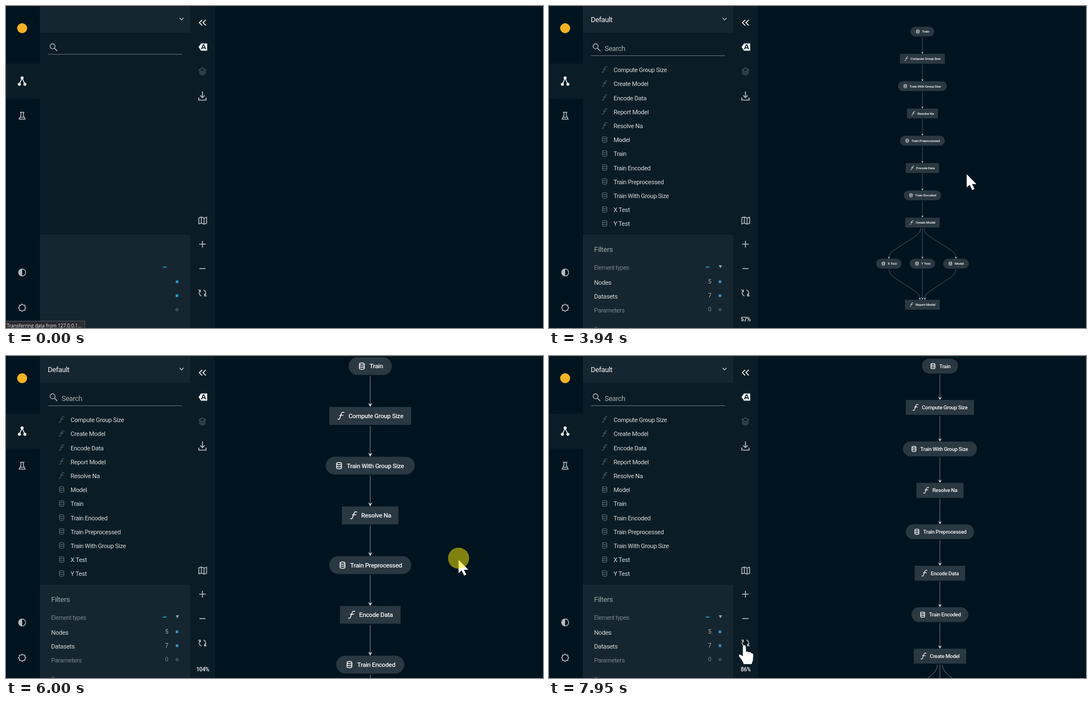
Animation, 965 px wide and 580 px high, one loop 8000 ms. Source, as an HTML page with a canvas:

```html
<!DOCTYPE html>
<html lang="en">
<head>
<meta charset="utf-8">
<title>Pipeline graph</title>
<style>
  html, body { margin: 0; width: 100%; height: 100%; overflow: hidden; background: #001420; }
  canvas { display: block; width: 965px; height: 580px; }
</style>
</head>
<body>
<canvas id="stage" width="965" height="580"></canvas>
<script>
const ctx = document.getElementById('stage').getContext('2d');
const LOOP = 8000, ROW = 86.4;
const SANS = 'Roboto, "Open Sans", sans-serif';
const BG = '#001420', PANEL = '#0a1d27', RAISED = '#162630', NODE = '#2a3841';
const WHITE = '#f2f4f5', SOFT = '#d3d8da', GREY = '#b3babe', DIM = '#77828a', FAINT = '#53616a';

const functions = ['Compute Group Size', 'Create Model', 'Encode Data', 'Report Model', 'Resolve Na'];
const datasets = ['Model', 'Train', 'Train Encoded', 'Train Preprocessed', 'Train With Group Size', 'X Test', 'Y Test'];

// label, width, x, y relative to the first node at 100 %
const nodes = [
  ['Train', 75, 0, 0],
  ['Compute Group Size', 142, 0, ROW],
  ['Train With Group Size', 154, 0, ROW * 2],
  ['Resolve Na', 98, 0, ROW * 3],
  ['Train Preprocessed', 142, 0, ROW * 4],
  ['Encode Data', 105, 0, ROW * 5],
  ['Train Encoded', 118, 0, ROW * 6],
  ['Create Model', 109, 0, ROW * 7],
  ['X Test', 80, -106, ROW * 7 + 130],
  ['Y Test', 80, 0, ROW * 7 + 130],
  ['Model', 81, 106, ROW * 7 + 130],
  ['Report Model', 110, 0, ROW * 7 + 260]
];

// time, x, y of the pointer
const pointerKeys = [
  [2040, 801, 574], [2400, 765, 440], [2790, 692, 494], [3200, 672, 152], [3530, 672, 152],
  [3720, 880, 250], [3940, 751, 303], [4150, 663, 323], [4370, 663, 323], [4780, 772, 237],
  [5110, 836, 189], [5320, 795, 428], [5520, 796, 433], [5750, 796, 411], [6330, 836, 310],
  [6900, 836, 310], [7120, 600, 430], [7340, 357, 508], [7600, 347, 519], [7950, 351, 521]
];
const panKeys = [
  [5110, 677.6, -181.8], [5320, 636.5, 57], [5520, 637.5, 62], [5750, 637.5, 62], [6330, 676.8, -39]
];
const zoomKeys = [
  [4150, 0.569], [4640, 1.037], [6619, 1.037], [6620, 1], [6900, 0.864]
];

const clamp = v => Math.max(0, Math.min(1, v));
const smooth = v => { v = clamp(v); return v * v * (3 - 2 * v); };
const within = (t, a, b) => t >= a && t < b;

function track(keys, t) {
  if (t <= keys[0][0]) return keys[0].slice(1);
  for (let i = 1; i < keys.length; i++) {
    const a = keys[i - 1], b = keys[i];
    if (t <= b[0]) {
      const p = (t - a[0]) / (b[0] - a[0]);
      return a.slice(1).map((v, j) => v + (b[j + 1] - v) * p);
    }
  }
  return keys[keys.length - 1].slice(1);
}

function view(t) {
  const k = track(zoomKeys, t)[0];
  if (t < 5110) {
    const r = k / 0.569;
    return [663 + 8 * r, 323 - 277 * r, k];
  }
  if (t < 6600) return [...track(panKeys, t), k];
  const r = k / 1.037;
  return [831 - 154.2 * r, 303 - 342 * r, k];
}

function rect(x, y, w, h, color) {
  ctx.fillStyle = color;
  ctx.fillRect(x, y, w, h);
}

function text(s, x, y, size, color, weight = 400, align = 'left') {
  ctx.font = `${weight} ${size}px ${SANS}`;
  ctx.letterSpacing = (-0.03 * size) + 'px';
  ctx.textAlign = align;
  ctx.fillStyle = color;
  ctx.fillText(s, x, y);
}

function shape(d, x, y, color, width, scale = 1) {
  ctx.save();
  ctx.translate(x, y);
  ctx.scale(scale, scale);
  const p = new Path2D(d);
  if (width) {
    ctx.strokeStyle = color;
    ctx.lineWidth = width;
    ctx.stroke(p);
  } else {
    ctx.fillStyle = color;
    ctx.fill(p);
  }
  ctx.restore();
}

function disc(x, y, r, color, width) {
  ctx.beginPath();
  ctx.arc(x, y, r, 0, Math.PI * 2);
  if (width) {
    ctx.strokeStyle = color;
    ctx.lineWidth = width;
    ctx.stroke();
  } else {
    ctx.fillStyle = color;
    ctx.fill();
  }
}

const functionIcon = 'M-6 5.4C-3.4 7 -2.3 5 -1.7 2.6L.4 -3.4C1.2 -6.4 3 -7 5.8 -5.6M-3 -1H4';
const dataIcon = 'M-4.2 -3.6A4.2 1.9 0 0 1 4.2 -3.6A4.2 1.9 0 0 1 -4.2 -3.6V3.6A4.2 1.9 0 0 0 4.2 3.6V-3.6M-4.2 0A4.2 1.9 0 0 0 4.2 0';
const drawIcon = (isFn, x, y, color, scale, width) =>
  shape(isFn ? functionIcon : dataIcon, x, y, color, width, scale);

function edge(x0, y0, x1, y1) {
  ctx.beginPath();
  ctx.moveTo(x0, y0);
  if (x0 !== x1) {
    const ay = y0 + 15, by = y1 - 17;
    const at = p => [x0 + (x1 - x0) * p, ay + (by - ay) * p];
    ctx.quadraticCurveTo(x0, ay, ...at(0.2));
    ctx.lineTo(...at(0.84));
    ctx.quadraticCurveTo(x1, by, x1, y1 - 3);
  } else {
    ctx.lineTo(x1, y1 - 3);
  }
  ctx.strokeStyle = '#7a858b';
  ctx.lineWidth = 1;
  ctx.stroke();
  shape('M-3.6 -7L0 0L3.6 -7L0 -4.4Z', x1, y1, '#d9dddf');
}

function drawNode([label, w, x, y]) {
  const isFn = functions.includes(label);
  ctx.beginPath();
  ctx.roundRect(x - w / 2, y - 15.5, w, 31, isFn ? 0 : 15.5);
  ctx.fillStyle = NODE;
  ctx.fill();
  const left = x - w / 2;
  drawIcon(isFn, left + (isFn ? 20.5 : 23), y, WHITE, 1, 1.4);
  text(label, left + (isFn ? 33.3 : 36.3), y + 4, 11, WHITE, 500);
}

function drawGraph(t) {
  const [x, y, k] = view(t);
  ctx.save();
  ctx.globalAlpha = smooth((t - 410) / 560);
  ctx.translate(x, y);
  ctx.scale(k, k);
  for (let i = 0; i < 7; i++) edge(0, ROW * i + 17.5, 0, ROW * (i + 1) - 15.5);
  const top = ROW * 7;
  for (const side of [-1, 0, 1]) {
    edge(side * 5, top + 17.5, side * 106, top + 114.5);
    edge(side * 106, top + 147.5, side * 8, top + 244.5);
  }
  nodes.forEach(drawNode);
  ctx.restore();
}

function drawRail() {
  rect(0, 0, 61, 580, BG);
  rect(0, 104, 61, 63, PANEL);
  disc(29, 40, 9, '#f5b324');
  shape('M0 -5L-5 6M0 -5L5 6', 29, 135, WHITE, 1.6);
  [[29, 129.5], [24, 141], [34, 141]].forEach(([x, y]) => disc(x, y, 2.7, WHITE));
  shape('M-4 -6.5H4M-2.2 -6V-1L-5.4 5.7H5.4L2.2 -1V-6M-3.6 2.4H3.6', 29, 198, GREY, 1.5);
  disc(29, 480, 6.3, GREY, 1.4);
  shape('M0 -6.5A6.5 6.5 0 0 0 0 6.5Z', 29, 480, GREY);
  shape('M-2 -4.8L0 -6.5L2 -4.8H4.8V-2L6.5 0L4.8 2V4.8H2L0 6.5L-2 4.8H-4.8V2L-6.5 0L-4.8 -2V-4.8Z', 29, 543.5, GREY, 1.5);
}

function drawTools(t) {
  rect(331, 0, 45, 580, PANEL);
  shape('M-.5 -5L-5.5 0L-.5 5M6 -5L1 0L6 5', 353, 30, WHITE, 1.7);
  shape('M-8 0L-3.5 -6.5H7.5V6.5H-3.5Z', 354, 74, WHITE);
  shape('M-2.2 4L.8 -4H2.2L5.2 4M-1.2 1.4H4.2', 353.5, 74, PANEL, 1.7);
  shape('M0 -6L6 -2.5L0 1L-6 -2.5ZM-6 .5L0 4L6 .5M-6 3.5L0 7L6 3.5', 353, 117.5, FAINT, 1.3);
  shape('M0 -8V3M-4 -1L0 3L4 -1M-6.5 3V7.5H6.5V3', 353, 162, GREY, 1.7);
  shape('M-7 -5L-2.4 -6.5L2.4 -4.5L7 -6V5L2.4 6.5L-2.4 4.5L-7 6ZM-2.4 -6.5V4.5M2.4 -4.5V6.5', 353.5, 386.5, GREY, 1.5);
  shape('M-6 0H6M0 -6V6', 353, 429, GREY, 1.6);
  shape('M-5.5 0H5.5', 353, 473, GREY, 1.6);
  shape('M-2 5.5A6 6 0 0 1 -4.5 -4M2 -5.5A6 6 0 0 1 4.5 4M-7.5 -5.2H-3.8V-1.5M7.5 5.2H3.8V1.5', 353, 517, GREY, 1.6);
  if (t >= 90) {
    ctx.globalAlpha = smooth((t - 20) / 260);
    text(Math.round(view(t)[2] * 100) + '%', 353.5, 568, 10, WHITE, 500, 'center');
    ctx.globalAlpha = 1;
  }
}

function drawPanel(t) {
  const loaded = t >= 90;
  rect(61, 0, 270, 580, PANEL);
  rect(61, 0, 270, 48, RAISED);
  rect(61, 412, 270, 168, RAISED);
  shape('M-3.5 -2L0 1.7L3.5 -2', 315.5, 23.5, GREY, 1.3);
  disc(83.7, 72.7, 4.4, GREY, 1.4);
  shape('M0 0L5 5', 87, 76, GREY, 1.6);
  rect(76, loaded ? 89 : 86.5, 240, 1, '#69757c');

  rect(282, 469.5, 6.5, 1.6, '#1fa5cd');
  const dot = t < 2040 ? '#1fa0d0' : '#3a90c6';
  rect(305, 494.5, 4.6, 4.6, dot);
  rect(305, 519.5, 4.6, 4.6, dot);
  disc(307.4, 547, 2, DIM, 1);
  if (!loaded) return;

  ctx.globalAlpha = smooth((t - 20) / 260);
  text('Default', 75, 28.5, 13, WHITE);
  text('Search', 100, 80.5, 12.8, '#a5adb1');
  [...functions, ...datasets].forEach((label, i) => {
    const y = 115 + i * 25.2, isFn = i < functions.length;
    drawIcon(isFn, 100, y - 0.5, FAINT, isFn ? 0.82 : 0.95, 1.3);
    text(label, 116, y + 4.2, 11.2, SOFT);
  });
  text('Filters', 81, 442.5, 13.3, '#98a2a7');
  text('Element types', 81, 475, 10.7, DIM);
  shape('M-3 -2.5H3L0 3Z', 308, 469.5, '#98a2a7');
  [['Nodes', 5, SOFT], ['Datasets', 7, SOFT], ['Parameters', 0, DIM]].forEach(([label, count, color], i) => {
    const y = 501.7 + i * 25.2;
    text(label, 81, y, 11.35, color);
    text(count, 291.5, y - 1.7, 10.3, color === DIM ? DIM : GREY, 400, 'right');
  });
  text('Tags', 81, 585.5, 10.7, FAINT);
  ctx.globalAlpha = 1;
}

function drawStatus() {
  rect(0, 567, 142, 13, '#55565a');
  rect(0, 568, 141, 12, '#2a2b2f');
  ctx.font = '8.5px "Open Sans", sans-serif';
  ctx.letterSpacing = '0px';
  ctx.textAlign = 'left';
  ctx.fillStyle = '#f0f0f2';
  ctx.fillText('Transferring data from 127.0.0.1...', 1.5, 578.5);
}

const arrow = 'M0 0V24L5.4 19L10 28.3L14 26.4L9.6 17.6H17.5Z';
const hand = 'M-2.6 2Q0 -2.5 2.6 2L3.2 12Q6 10 8 13Q11 11 12.5 14.5Q16 14 16 18L15.4 27L13 34H-1Q-2 30 -5 26L-10 19Q-9 15 -5.4 18L-2.6 20Z';

function drawPointer(t) {
  if (t < 2040) return;
  const [x, y] = track(pointerKeys, t);
  const pointing = within(t, 2860, 3560) || within(t, 4150, 4900) || x < 376;
  shape(pointing ? hand : arrow, x, y, '#ffffff');
  if (within(t, 5110, 5560) || within(t, 5750, 6300)) disc(x, y - 3, 19, 'rgba(255,240,0,0.5)');
}

function draw(t) {
  rect(0, 0, 965, 580, BG);
  drawGraph(t);
  drawPanel(t);
  drawTools(t);
  drawRail();
  if (t < 270) drawStatus();
  drawPointer(t);
  rect(0, 0, 965, 1, '#1b2024');
}

const start = performance.now();
function frame() {
  draw((performance.now() - start) % LOOP);
  requestAnimationFrame(frame);
}
frame();
</script>
</body>
</html>
```
